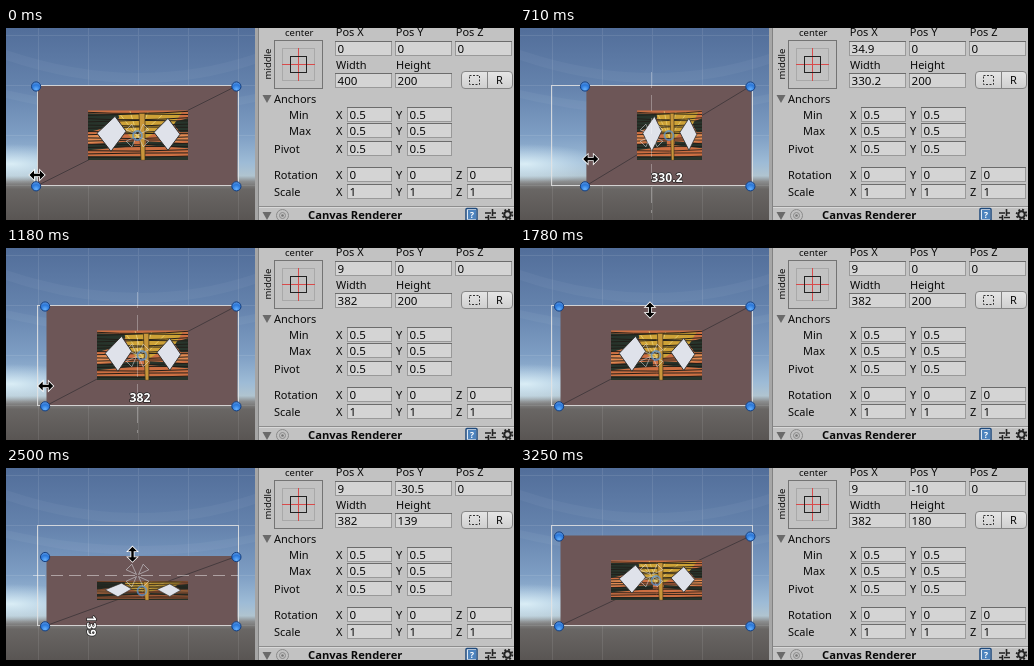
Write an HTML page that moves like this. It is 508x192 px and loops after 3.61 s.

```html
<!DOCTYPE html>
<html lang="en">
<head>
<meta charset="utf-8">
<style>
  html, body { margin: 0; width: 100%; height: 100%; overflow: hidden; background: #c2c2c2; }
  svg { display: block; }
  text { font: 11px "Noto Sans", "Open Sans", sans-serif; fill: #0a0a0a; }
  .value { font-size: 11.6px; }
  .small { font-size: 9.5px; }
  .bold { font-weight: 700; font-size: 11.2px; }
  .size { font-weight: 700; font-size: 12.2px; fill: #fff; stroke: #222; stroke-width: 1.3px; paint-order: stroke; text-anchor: middle; }
</style>
</head>
<body>
<svg id="stage" width="508" height="192" viewBox="0 0 508 192">
  <defs>
    <linearGradient id="sky" x2="0" y2="1">
      <stop offset="0" stop-color="#526e9a"/>
      <stop offset=".3" stop-color="#6482ac"/>
      <stop offset=".55" stop-color="#7d9dc3"/>
      <stop offset=".7" stop-color="#9dbbd6"/>
      <stop offset=".77" stop-color="#b0c4d0"/>
      <stop offset=".8" stop-color="#8a8c8d"/>
      <stop offset=".84" stop-color="#696664"/>
      <stop offset="1" stop-color="#595553"/>
    </linearGradient>
    <radialGradient id="glow">
      <stop offset="0" stop-color="#e4f6fb" stop-opacity=".85"/>
      <stop offset="1" stop-color="#d8eefa" stop-opacity="0"/>
    </radialGradient>
    <radialGradient id="knob" cx=".5" cy=".8" r=".8">
      <stop offset="0" stop-color="#62b0ff"/>
      <stop offset=".6" stop-color="#2a76d8"/>
      <stop offset="1" stop-color="#5f9be4"/>
    </radialGradient>
    <linearGradient id="button" x2="0" y2="1">
      <stop offset="0" stop-color="#e6e6e6"/>
      <stop offset="1" stop-color="#cfcfcf"/>
    </linearGradient>
    <clipPath id="view"><rect width="249" height="192"/></clipPath>
    <clipPath id="frame"><rect width="100" height="50"/></clipPath>
  </defs>

  <g clip-path="url(#view)">
    <rect width="249" height="192" fill="url(#sky)"/>
    <ellipse cx="5" cy="136" rx="80" ry="20" fill="url(#glow)"/>
    <path d="M0 22Q130 66 249 26V36Q130 76 0 32ZM0 62Q130 92 249 66V74Q130 102 0 70Z" fill="#fff" opacity=".04"/>
    <path d="M32.500 0V192M82.500 0V192M132.500 0V192M182.500 0V192M232.500 0V192M0 7.500H249M0 57.500H249M0 107.500H249M0 157.500H249"
          stroke="#fff" opacity=".09"/>
    <rect id="panel" fill="#6d5657"/>
    <path id="diagonal" stroke="#41383c" stroke-width=".9"/>
    <g id="picture"><g clip-path="url(#frame)">
      <rect width="100" height="50" fill="#cc6f42"/>
      <path d="M0 3L34 4L24 16L0 22ZM100 8L84 12L92 22H100ZM0 34L46 31V36L0 40ZM58 31L100 33V38L58 35ZM0 46H100V50H0Z" fill="#27342b"/>
      <path d="M30 3L94 2L86 14L68 22L58 28H44L34 18Z" fill="#cda136"/>
      <path d="M0 24L12 23L20 31L0 33ZM90 24H100V30L86 32Z" fill="#e08a52"/>
      <path d="M50 27L32 4M50 27L42 1M50 27L60 2M50 27L74 5" stroke="#e8cd6c"/>
      <path id="planks" stroke="#211d18" stroke-width="1" fill="none"/>
      <path d="M51 3H57V50H53Z" fill="#c8963a" stroke="#3a2c18" stroke-width=".7"/>
      <path d="M27 6L38 21L23 41L9 23ZM80 8L92 24L80 40L66 22Z" fill="#dfe2ea" stroke="#33312e"/>
    </g></g>
    <rect x="31.5" y="57.5" width="201" height="100" fill="none" stroke="#e3e3e3" stroke-opacity=".85"/>
    <path id="guideX" d="M131.500 44V185" stroke="#fff" stroke-dasharray="16 7"/>
    <path id="guideY" d="M27 107.500H232" stroke="#fff" stroke-dasharray="12 6"/>
    <g id="anchor" fill="none" stroke="#dfe3e8" stroke-opacity=".55" stroke-width=".9"></g>
    <circle id="pivot" r="4.500" fill="none" stroke="#5d94cf" stroke-width="1.800" opacity=".75"/>
    <g id="knobs"></g>
    <text id="widthLabel" class="size"></text>
    <text id="heightLabel" class="size"></text>
    <path id="cursor" d="M-7.500 0L-3 -4.500V-1.200H3V-4.500L7.500 0L3 4.500V1.200H-3V4.500Z"
          fill="#000" stroke="#fff" stroke-width="1.600" paint-order="stroke"/>
  </g>

  <g id="inspector">
    <rect x="249" width="259" height="192" fill="#c2c2c2"/>
    <rect x="249" width="3" height="192" fill="#a6a6a6"/>
    <path d="M252.500 0V192" stroke="#828282"/>
    <rect x="268.500" y="12.500" width="48" height="48" fill="#c2c2c2" stroke="#747474"/>
    <rect x="276.500" y="20.500" width="32" height="32" fill="none" stroke="#a9a9a9"/>
    <path d="M276 36.500H309M292.500 20V53" stroke="#d84a4a"/>
    <rect x="284.500" y="28.500" width="16" height="16" fill="none" stroke="#222"/>
    <text class="small" transform="translate(264.500 36) rotate(-90)" text-anchor="middle">middle</text>
    <rect x="455.500" y="43.500" width="51" height="17" rx="3.500" fill="url(#button)" stroke="#858585"/>
    <path d="M481.500 44V60" stroke="#858585"/>
    <rect x="463.500" y="47.500" width="10" height="9" fill="none" stroke="#333" stroke-dasharray="2 1.500"/>
    <path d="M256.500 67H265.500L261 75ZM256.500 184H265.500L261 192Z" fill="#6a6a6a"/>
    <path d="M253 178.500H508" stroke="#8e8e8e"/>
    <path d="M253 179.500H508" stroke="#d8d8d8"/>
    <g fill="none" stroke="#8a8a8a">
      <circle cx="276.500" cy="187.500" r="6"/><circle cx="276.500" cy="187.500" r="3"/>
    </g>
    <circle cx="276.500" cy="187.500" r="1.300" fill="#777"/>
    <rect x="460" y="180.500" width="11" height="12" rx="1" fill="#dfe9f4" stroke="#1f4a7c" stroke-width="1.500"/>
    <rect x="462" y="182" width="8" height="9" fill="#4b82bd"/>
    <text x="464" y="190" style="font-size:8.500px;font-weight:700;fill:#fff">?</text>
    <path d="M479 185H485M487 185H490M479 189.500H482M484 189.500H490M486.500 181V188M482.500 187V192" stroke="#222" stroke-width="1.600"/>
    <circle cx="501.500" cy="186.500" r="3.200" fill="none" stroke="#222" stroke-width="2"/>
    <circle cx="501.500" cy="186.500" r="4.900" fill="none" stroke="#222" stroke-width="1.800" stroke-dasharray="1.900 1.950"/>
  </g>
</svg>
<script>
const LOOP = 3610, STEP = 58.4;
const $ = id => document.getElementById(id);
const clamp = (v, lo, hi) => Math.min(hi, Math.max(lo, v));
const lerp = (a, b, k) => a + (b - a) * k;

function set(el, attrs) {
  for (const name in attrs) el.setAttribute(name, attrs[name]);
  return el;
}
function add(parent, tag, attrs, text = "") {
  const el = set(document.createElementNS("http://www.w3.org/2000/svg", tag), attrs);
  el.textContent = text;
  parent.append(el);
  return el;
}

const inspector = $("inspector");
const COLUMNS = [329, 389, 449];
const label = (x, y, text, cls = "") => add(inspector, "text", { x, y, class: cls }, text);
function field(x, y, w, value) {
  add(inspector, "rect", { x: x + .5, y: y + .5, width: w, height: 14, fill: "#d4d4d4", stroke: "#999" });
  add(inspector, "path", { d: `M${x} ${y + .5}h${w + 1}`, stroke: "#6c6c6c" });
  return label(x + 2.5, y + 11.8, value, "value");
}

label(279, 7.5, "center", "small");
["Pos X", "Pos Y", "Pos Z"].forEach((s, i) => label(COLUMNS[i] + .8, 8.3, s));
const [posX, posY] = COLUMNS.map(x => field(x, 13, 56, "0"));
label(330, 41, "Width");
label(390, 41, "Height");
const widthField = field(COLUMNS[0], 45, 56, "400");
const heightField = field(COLUMNS[1], 45, 56, "200");
label(490, 56, "R");
label(268, 75, "Anchors");

function row(name, x, baseline, values) {
  label(x, baseline, name);
  values.forEach((value, i) => {
    label(COLUMNS[i] + 1, baseline, "XYZ"[i]);
    field(COLUMNS[i] + 12, baseline - 12, 44, value);
  });
}
row("Min", 283, 91, ["0.5", "0.5"]);
row("Max", 283, 107, ["0.5", "0.5"]);
row("Pivot", 268, 125, ["0.5", "0.5"]);
row("Rotation", 268, 151, ["0", "0", "0"]);
row("Scale", 268, 168, ["1", "1", "1"]);
label(302, 191, "Canvas Renderer", "bold");

let planks = "";
for (let y = 2; y < 50; y += 3.2) planks += `M0 ${y}Q50 ${y + 3 * Math.sin(y)} 100 ${y - 1}`;
set($("planks"), { d: planks });

for (let a = 45; a < 360; a += 90)
  add($("anchor"), "path", { d: "M0 -1.500L-4 -12H4Z", transform: `translate(131.5 107.5) rotate(${a})` });

const knobs = [0, 1, 2, 3].map(() =>
  add($("knobs"), "circle", { r: 4.6, fill: "url(#knob)", stroke: "#143f80", "stroke-width": 1 }));

// Sizes reached on each step of the two drags
const widths = [396, 388, 377, 362, 344, 330.2, 320, 316, 321, 334, 350, 366, 377, 382];
const heights = [196, 184, 158.4, 134.2, 129.8, 130.4, 133, 139, 150, 164.1, 180, 180];

const stepAt = (t, start) => Math.floor((t - start + 4) / STEP);
const sizeAt = (list, i, rest) => i < 0 ? rest : list[Math.min(i, list.length - 1)];
// The inspector refreshes on every second step
const shownStep = i => i % 2 ? i : i - 1;
const leftOf = w => 231.5 - w / 2;
const topOf = h => 157.5 - h / 2;
const format = v => String(+v.toFixed(1));

function cursorAt(t, i, j) {
  if (t < 420) return { x: 31, y: 147 - (t >= 60 ? 3.5 : 0) - (t >= 120 ? 3.5 : 0), turn: 0 };
  if (t < 1356) {
    const x = leftOf(sizeAt(widths, i + 1, 400)) - .8;
    return { x, y: 140 - 9 * (x - 31) / 40, turn: 0 };
  }
  if (j < 0) {
    const n = clamp(stepAt(t, 1360) + 1, 0, 8), k = n / 8, e = k * k * (3 - 2 * k);
    return { x: lerp(39, 130, e), y: lerp(137, 62, e), turn: n > 2 ? 90 : 0 };
  }
  return { x: 130 - 4 * Math.min(j / 8, 1), y: topOf(sizeAt(heights, j + 1, 200)) + 3.7, turn: 90 };
}

function draw(t) {
  const i = stepAt(t, 420), j = stepAt(t, 2080);
  const w = sizeAt(widths, i, 400), h = sizeAt(heights, j, 200);
  const left = leftOf(w), top = topOf(h), midX = left + w / 4, midY = top + h / 4;

  set($("panel"), { x: left, y: top, width: w / 2, height: h / 2 });
  set($("diagonal"), { d: `M${left} 157.5L231.5 ${top}` });
  set($("picture"), { transform: `translate(${left + 50.5} ${top + 24.8}) scale(${w / 200 - 1} ${h / 100 - 1})` });
  set($("pivot"), { cx: midX, cy: midY });
  knobs.forEach((knob, n) => set(knob, { cx: n % 2 ? 230.4 : left - 1.4, cy: n < 2 ? top + 1 : 158.3 }));

  const wide = i >= 0 && t < 1360 ? 1 : 0;
  const tall = j < 0 || t >= 3250 ? 0 : t >= 3190 ? .5 : 1;
  set($("guideX"), { opacity: wide * .3 });
  set($("guideY"), { opacity: tall * .45 });
  set($("widthLabel"), { x: midX - 2, y: 154.3, opacity: wide }).textContent = format(w);
  set($("heightLabel"), { transform: `translate(80.8 ${midY + 35}) rotate(90)`, opacity: tall }).textContent = format(h);

  const shownW = sizeAt(widths, shownStep(i), 400), shownH = sizeAt(heights, shownStep(j), 200);
  posX.textContent = format((400 - shownW) / 2);
  posY.textContent = format((shownH - 200) / 2);
  widthField.textContent = format(shownW);
  heightField.textContent = format(shownH);

  const c = cursorAt(t, i, j);
  set($("cursor"), { transform: `translate(${c.x} ${c.y}) rotate(${c.turn})`, opacity: t < 2910 ? 1 : 0 });
}

const began = performance.now();
function tick() {
  draw((performance.now() - began) % LOOP);
  requestAnimationFrame(tick);
}
tick();
</script>
</body>
</html>
```
